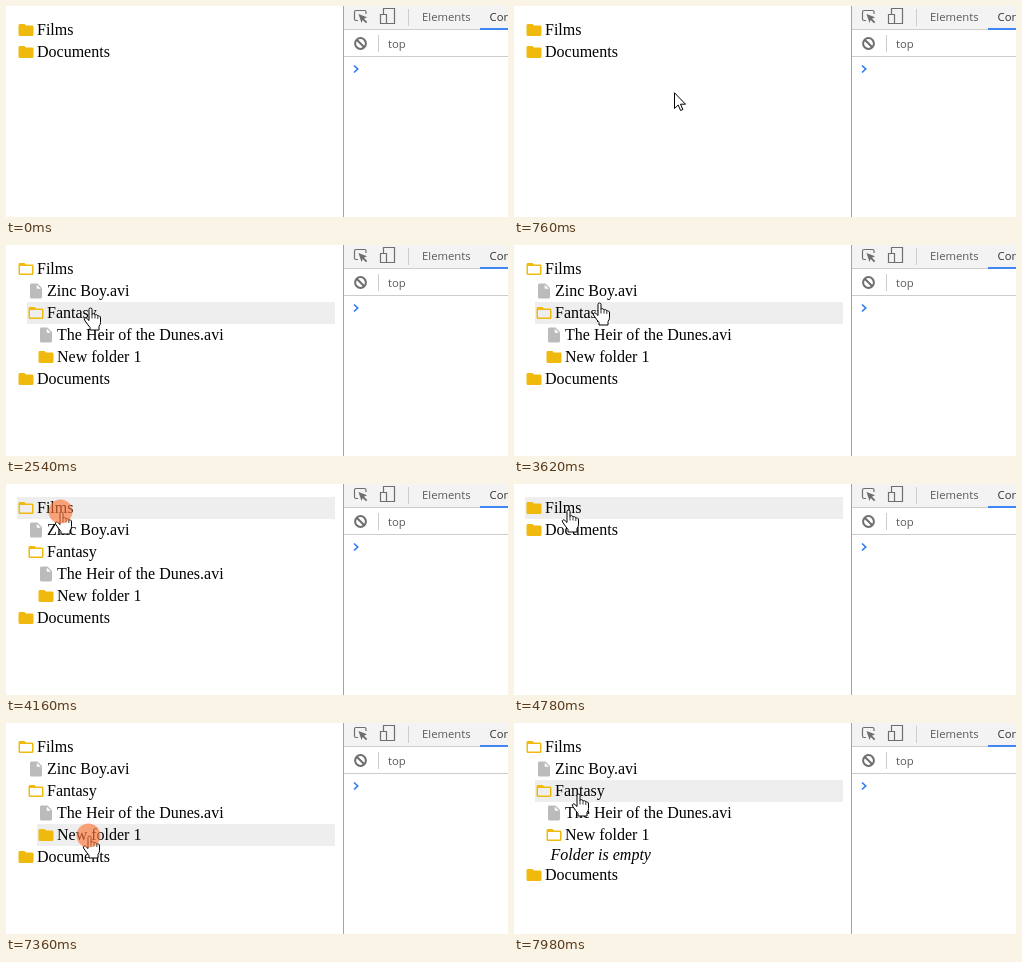
Recreate the animation shown at these times as an HTML page. Size 502 by 211 pixels, loop 8 s.

```html
<!DOCTYPE html>
<html lang="en">
<head>
<meta charset="utf-8">
<title>Folder tree</title>
<style>
html, body { margin: 0; width: 100%; height: 100%; overflow: hidden; background: #fff; }
svg { display: block; }
.tree text { font: 16px "Liberation Serif", "Times New Roman", serif; }
.tree .empty text { font-style: italic; }
.tools text { font: 11.3px "Open Sans", "Noto Sans", sans-serif; fill: #5a5a5a; }
.icon { fill: none; stroke: #6e6e6e; stroke-width: 1.2; }
</style>
</head>
<body>
<svg width="502" height="211" viewBox="0 0 502 211">
  <g class="tree" id="tree"></g>

  <g class="tools">
    <path fill="#f3f3f3" d="M338 0H502V23H338z"/>
    <path fill="#cdcdcd" d="M338 23H502V24H338zM338 50H502V51H338zM402 3H403V20H402zM372 29H373V46H372z"/>
    <path fill="#a3a3a3" d="M337 0H338V211H337z"/>
    <path fill="#4285f4" d="M474 22H502V24H474z"/>
    <path class="icon" d="M352 14.5H350Q348.5 14.5 348.5 13V6Q348.5 4.5 350 4.5H358.5Q360 4.5 360 6V8"/>
    <path fill="#6e6e6e" d="M352.5 8L361 11.3L358 12.7L361.3 16L360 17.3L356.7 14L355.5 17z"/>
    <path class="icon" d="M377.5 8V2.5H388.5V17.5H380"/>
    <path class="icon" d="M374.5 8.5H380.5V17.5H374.5z"/>
    <text x="416" y="15">Elements</text>
    <text x="483.5" y="15" style="fill:#333">Console</text>
    <g class="icon" style="stroke-width:2"><circle cx="354.5" cy="37.5" r="5.4"/><path d="M350.7 33.7L358.3 41.3"/></g>
    <text x="382" y="42">top</text>
    <path fill="none" stroke="#367cf1" stroke-width="1.7" d="M348 59.5L351.7 63L348 66.5"/>
  </g>

  <g id="hand" fill="#fff" stroke="#000" stroke-linejoin="round">
    <path d="M5.5 2Q5.5 .5 7 .5T8.5 2V7Q8.7 6 10 6.2Q11.5 6.4 11.5 7.8Q12 7 13 7.2Q14.3 7.5 14.3 8.8Q15 8 16 8.5Q17 9 17 10.5V15Q17 17 15.5 19V22.5H6.5V20Q4 17 1 12.5Q.3 10.8 1.6 10.3Q3 10 5.5 13z"/>
    <path fill="none" stroke-width=".8" d="M8.5 7V11M11.5 8V11M14.3 9V11.5"/>
  </g>
  <path id="arrow" fill="#fff" stroke="#000" d="M.5 .8V16.5L4.2 13L6.6 18.5L8.9 17.5L6.5 12.2H11.5z"/>
  <circle id="press" r="12" fill="#fd7639" fill-opacity=".65"/>
</svg>

<script>
const LOOP = 8000;
const LEFT = 11, RIGHT = 329, TOP = 13, INDENT = 10;

const ICONS = {
  folder: "M10 4H4c-1.1 0-2 .9-2 2v12c0 1.1.9 2 2 2h16c1.1 0 2-.9 2-2V8c0-1.1-.9-2-2-2h-8z",
  open: "M20 6h-8l-2-2H4c-1.1 0-2 .9-2 2v12c0 1.1.9 2 2 2h16c1.1 0 2-.9 2-2V8c0-1.1-.9-2-2-2zm0 12H4V8h16z",
  file: "M6 2c-1.1 0-2 .9-2 2v16c0 1.1.9 2 2 2h12c1.1 0 2-.9 2-2V8l-6-6zm7 7V3.5L18.5 9z"
};

// toggles: times at which a folder opens or closes
const rows = [
  { name: "Films", level: 0, kind: "folder", toggles: [1460, 4310, 5560] },
  { name: "Zinc Boy.avi", level: 1, kind: "file" },
  { name: "Fantasy", level: 1, kind: "folder", toggles: [2540] },
  { name: "The Heir of the Dunes.avi", level: 2, kind: "file" },
  { name: "New folder 1", level: 2, kind: "folder", toggles: [7440] },
  { name: "Folder is empty", level: 3, kind: "empty" },
  { name: "Documents", level: 0, kind: "folder", toggles: [] }
];

// first step, last step, number of steps, end point
const moves = [
  [300, 1060, 11, 58, 27],
  [1920, 2230, 5, 83, 62],
  [3240, 3240, 1, 93, 66],
  [3540, 4010, 7, 54, 27],
  [4710, 4780, 2, 53, 25],
  [6660, 7140, 7, 82, 112],
  [7820, 7980, 3, 63, 70]
];
const ENTRY = [364, 206];
const presses = [[1310, 1460], [2460, 2540], [4160, 4310], [5500, 5560], [7360, 7440]];

const byId = id => document.getElementById(id);
const show = (el, on) => { el.style.display = on ? "" : "none"; };
const place = (el, x, y) => el.setAttribute("transform", `translate(${x} ${y})`);

function add(parent, tag, attrs) {
  const el = document.createElementNS("http://www.w3.org/2000/svg", tag);
  for (const key in attrs) el.setAttribute(key, attrs[key]);
  return parent.appendChild(el);
}

for (const row of rows) {
  const empty = row.kind === "empty";
  row.x = LEFT + row.level * INDENT;
  row.height = empty ? 18 : 22;
  row.el = add(byId("tree"), "g", { class: row.kind });
  if (!empty) {
    row.back = add(row.el, "rect", { width: RIGHT - row.x, height: row.height, fill: "#eee" });
    row.icon = add(row.el, "path", {
      transform: "translate(0 2) scale(.75)",
      fill: row.kind === "file" ? "#bbb" : "#efba0d"
    });
  }
  const label = add(row.el, "text", { x: empty ? -4.5 : 20, y: empty ? 14 : 16 });
  label.textContent = row.name;
}

const isOpen = (row, t) => row.toggles.filter(at => at <= t).length % 2 === 1;

function ease(u) {
  return (u + u * u * (3 - 2 * u)) / 2;
}

function pointer(t) {
  let [x, y] = ENTRY;
  for (const [start, end, steps, toX, toY] of moves) {
    if (t < start) break;
    const gap = (end - start) / Math.max(1, steps - 1);
    const done = t >= end ? steps : Math.floor((t - start) / gap) + 1;
    const k = ease(done / steps);
    x += (toX - x) * k;
    y += (toY - y) * k;
    if (t < end) break;
  }
  return [Math.round(x), Math.round(y)];
}

function draw(t) {
  const [x, y] = pointer(t);
  const present = t >= moves[0][0];
  let top = TOP, closedAt = Infinity, overRow = false;

  for (const row of rows) {
    if (row.level <= closedAt) closedAt = Infinity;
    const visible = closedAt === Infinity;
    show(row.el, visible);
    if (!visible) continue;

    place(row.el, row.x, top);
    if (row.icon) {
      const folder = row.kind === "folder";
      const open = folder && isOpen(row, t);
      const hover = present && x >= row.x && x < RIGHT && y >= top && y < top + row.height;
      row.icon.setAttribute("d", ICONS[open ? "open" : row.kind]);
      show(row.back, hover);
      overRow = overRow || hover;
      if (folder && !open) closedAt = row.level;
    }
    top += row.height;
  }

  show(byId("hand"), present && overRow);
  show(byId("arrow"), present && !overRow);
  show(byId("press"), presses.some(([from, to]) => t >= from && t < to));
  place(byId("hand"), x - 5.5, y + .5);
  place(byId("arrow"), x, y);
  place(byId("press"), x + .5, y + .5);
}

const begin = performance.now();
function tick() {
  draw((performance.now() - begin) % LOOP);
  requestAnimationFrame(tick);
}
tick();
</script>
</body>
</html>
```
